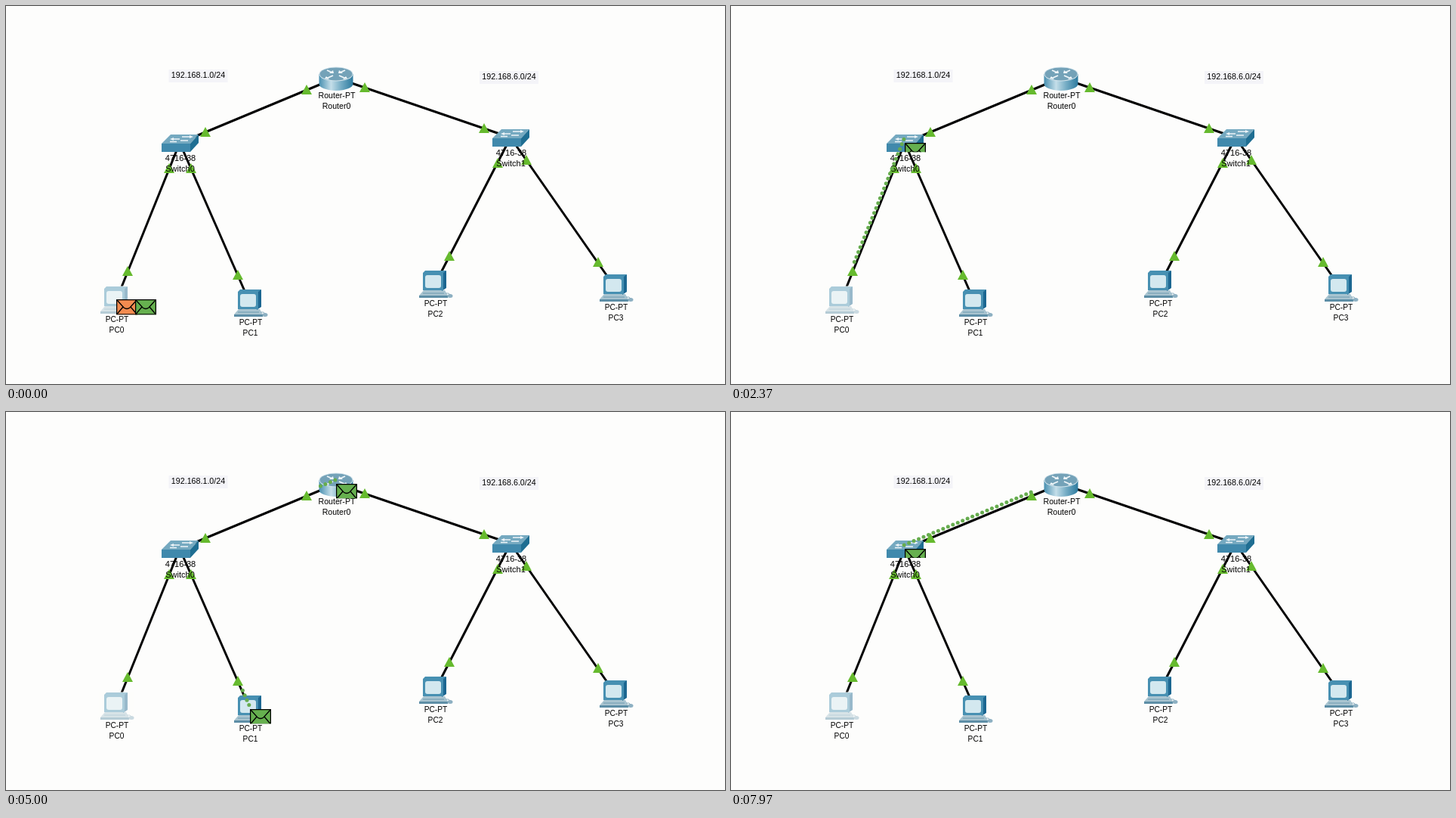
An HTML page with a canvas for the animation above (8 s loop, 952 by 500 pixels).

```html
<!DOCTYPE html>
<html lang="en">
<head>
<meta charset="utf-8">
<title>Network packet simulation</title>
<style>
  html, body { margin: 0; width: 100%; height: 100%; overflow: hidden; background: #fdfdfc; }
  canvas { display: block; }
</style>
</head>
<body>
<canvas id="stage" width="952" height="500"></canvas>
<script>
const ctx = document.getElementById('stage').getContext('2d');
const LOOP = 8000, FLIGHT = 1400;
const ENV_W = 28, ENV_H = 20.5, DOT_GAP = 7;
const GREEN = '#66b04f', ORANGE = '#f28b50';

const pc0 = { x: 146, y: 389 }, pc1 = { x: 323, y: 393 };
const pc2 = { x: 568, y: 368 }, pc3 = { x: 807, y: 373 };
const switch0 = { x: 230, y: 181 }, switch1 = { x: 668, y: 174 };
const router = { x: 437, y: 95 };

const links = [[switch0, router], [router, switch1], [switch0, pc0],
               [switch0, pc1], [switch1, pc2], [switch1, pc3]];
const ports = [[398, 111], [264, 167], [475, 108], [633, 162], [216, 215], [245, 215],
               [161, 351], [307, 356], [651, 208], [689, 204], [587, 331], [784, 339]];
const hops = [
  { start: 694, end: 2372, from: pc0, to: [switch0] },
  { start: 2372, end: 6324, from: switch0, to: [router, pc1] },
  { start: 6324, end: LOOP, from: router, to: [switch0] }
];

function polygon(color, ...points) {
  ctx.fillStyle = color;
  ctx.beginPath();
  points.forEach(([x, y]) => ctx.lineTo(x, y));
  ctx.closePath();
  ctx.fill();
}

function ellipse(color, x, y, rx, ry) {
  ctx.fillStyle = color;
  ctx.beginPath();
  ctx.ellipse(x, y, rx, ry, 0, 0, 2 * Math.PI);
  ctx.fill();
}

function stroke(color, width, ...points) {
  ctx.strokeStyle = color;
  ctx.lineWidth = width;
  ctx.beginPath();
  points.forEach(([x, y]) => ctx.lineTo(x, y));
  ctx.stroke();
}

function text(value, x, y, size) {
  ctx.font = `${size}px "Liberation Sans", Arial, sans-serif`;
  ctx.fillStyle = '#000';
  ctx.fillText(value, x, y);
}

function label(node, model, name, size, dy) {
  text(model, node.x + 1, node.y + dy, size);
  text(name, node.x + 0.5, node.y + dy + 14, size);
}

function at(node, draw) {
  ctx.save();
  ctx.translate(node.x, node.y);
  draw();
  ctx.restore();
}

function computer() {
  polygon('#a9c4d0', [-15, 8], [13, 8], [17, 15], [17, 18], [-21, 18], [-21, 15]);
  polygon('#5d8ea6', [-21, 15], [17, 15], [17, 18], [-21, 18]);
  stroke('#6f9bb0', 1, [-16, 12], [12, 12]);
  polygon('#1c6791', [9, -16], [15, -18], [15, 5], [9, 9]);
  polygon('#4790b2', [-16, -15], [-13, -18], [15, -18], [11, -15], [11, 8], [-16, 8]);
  ctx.fillStyle = '#d3e8ef';
  ctx.beginPath();
  ctx.roundRect(-13, -12, 21, 17, 3);
  ctx.fill();
  stroke('#8fb0c0', 1, [14, 12], [18, 12], [20, 14]);
  ellipse('#8db0c2', 20, 15.5, 3.5, 2.5);
}

function networkSwitch() {
  polygon('#75a9c0', [-12, -11], [25, -11], [14, 1], [-24, 1]);
  polygon('#4089ac', [-24, 1], [14, 1], [14, 12], [-24, 12]);
  polygon('#1f6e92', [14, 1], [25, -11], [25, 0], [14, 12]);
  const white = '#eef5f8';
  stroke(white, 1.5, [-9, -5], [0, -5]);
  stroke(white, 1.5, [3, -8], [13, -8]);
  stroke(white, 1.5, [-13, -1.5], [-4, -1.5]);
  stroke(white, 1.5, [1, -3], [11, -3]);
  polygon(white, [13, -10], [18, -8], [13, -6]);
  polygon(white, [-13, -5], [-8, -7], [-8, -3]);
}

function routerIcon() {
  const body = ctx.createLinearGradient(-22, 0, 22, 0);
  body.addColorStop(0, '#4c92b2');
  body.addColorStop(0.35, '#c4dee9');
  body.addColorStop(0.65, '#76adc5');
  body.addColorStop(1, '#2f7ca0');
  ctx.fillStyle = body;
  ctx.beginPath();
  ctx.ellipse(0, 8, 22.5, 9, 0, 0, Math.PI);
  ctx.lineTo(-22.5, -5);
  ctx.lineTo(22.5, -5);
  ctx.fill();
  ellipse('#d3e4ec', 0, -5, 22.5, 9.5);
  ellipse('#74a2b8', 0, -5, 21.5, 8.5);
  const white = '#f1f7fa';
  for (const side of [-1, 1]) {
    stroke(white, 1.8, [side * 4, -6.5], [side * 12, -10]);
    stroke(white, 1.8, [side * 4, -3], [side * 12, 0.5]);
    polygon(white, [side * 3, -6], [side * 4, -10], [side * 9, -6]);
    polygon(white, [side * 15, 1], [side * 9, 2], [side * 13, -2]);
  }
}

function flap(x, y) {
  ctx.moveTo(x + 1, y + 1);
  ctx.lineTo(x + 10, y + 11);
  ctx.quadraticCurveTo(x + 14, y + 14, x + 18, y + 11);
  ctx.lineTo(x + ENV_W - 1, y + 1);
}

// Shows the slice of an envelope between two fractions of its height.
function envelope(x, y, color, top = 0, bottom = 1) {
  ctx.save();
  ctx.beginPath();
  ctx.rect(x, y + top * ENV_H, ENV_W, (bottom - top) * ENV_H);
  ctx.clip();
  ctx.fillStyle = color;
  ctx.fillRect(x, y, ENV_W, ENV_H);
  ctx.strokeStyle = '#000';
  ctx.lineWidth = 1.3;
  ctx.strokeRect(x + 0.6, y + 0.6, ENV_W - 1.2, ENV_H - 1.2);
  ctx.beginPath();
  flap(x, y);
  ctx.moveTo(x + 1, y + ENV_H - 1);
  ctx.lineTo(x + 9, y + 10);
  ctx.moveTo(x + ENV_W - 1, y + ENV_H - 1);
  ctx.lineTo(x + 19, y + 10);
  ctx.stroke();
  if (top > 0) stroke('#000', 1.3, [x, y + top * ENV_H + 0.6], [x + ENV_W, y + top * ENV_H + 0.6]);
  ctx.restore();
}

function ghost(x, y) {
  ctx.save();
  ctx.fillStyle = '#fdfdfd';
  ctx.fillRect(x, y, ENV_W, ENV_H);
  ctx.strokeStyle = '#000';
  ctx.lineWidth = 1.8;
  ctx.setLineDash([2, 2]);
  ctx.strokeRect(x + 1, y + 1, ENV_W - 2, ENV_H - 2);
  ctx.lineWidth = 1.1;
  ctx.beginPath();
  flap(x, y + 1);
  ctx.stroke();
  ctx.restore();
}

function trail(from, to, tail, head) {
  const dx = to.x - from.x, dy = to.y - from.y, length = Math.hypot(dx, dy);
  for (let d = 0; d <= length * head; d += DOT_GAP) {
    const f = d / length;
    if (f >= tail) ellipse('#66ac4e', from.x + dx * f - 1, from.y + dy * f - 5, 2.5, 2.5);
  }
}

function drawHop({ start, from, to }, time) {
  const elapsed = time - start;
  const front = Math.min(elapsed / FLIGHT, 1);
  const tail = Math.min(Math.max(elapsed / FLIGHT - 1, 0), 1);
  const transfer = Math.min(elapsed / (2 * FLIGHT), 1);
  to.forEach(node => trail(from, node, tail, front));
  if (front < 1) envelope(from.x - ENV_W, from.y, GREEN, transfer, 1);
  for (const node of to) {
    if (front < 1) {
      ghost(Math.round(from.x + (node.x - from.x) * front),
            Math.round(from.y + (node.y - from.y) * front));
    } else {
      envelope(node.x, node.y, GREEN, 0, transfer);
    }
  }
}

function drawNetwork() {
  ctx.fillStyle = '#fdfdfc';
  ctx.fillRect(0, 0, 952, 500);
  links.forEach(([a, b]) => stroke('#000', 3, [a.x, a.y], [b.x, b.y]));
  ports.forEach(([x, y]) => polygon('#66ba2e', [x, y - 7], [x + 7, y + 6], [x - 7, y + 6]));

  [pc0, pc1, pc2, pc3].forEach(node => at(node, computer));
  at(pc0, () => polygon('rgba(253,253,252,.55)', [-23, -19], [24, -19], [24, 19], [-23, 19]));
  [switch0, switch1].forEach(node => at(node, networkSwitch));
  at(router, routerIcon);

  ctx.textAlign = 'center';
  ctx.textBaseline = 'middle';
  [pc0, pc1, pc2, pc3].forEach((node, i) => label(node, 'PC-PT', 'PC' + i, 10.2, 26.5));
  [switch0, switch1].forEach((node, i) => label(node, '4716-38', 'Switch' + i, 11, 20.5));
  label(router, 'Router-PT', 'Router0', 10.6, 24.5);
  for (const [address, x, y] of [['192.168.1.0/24', 254.5, 92.5], ['192.168.6.0/24', 666, 94.5]]) {
    ctx.fillStyle = '#f4f4f8';
    ctx.fillRect(x - 39, y - 8.5, 78, 17);
    text(address, x, y, 10.7);
  }
}

function frame(now) {
  const time = now % LOOP;
  drawNetwork();
  const hop = hops.find(h => time >= h.start && time < h.end);
  if (hop) {
    drawHop(hop, time);
  } else {
    envelope(pc0.x, pc0.y - 1, ORANGE);
    envelope(pc0.x + 25, pc0.y - 1, GREEN);
  }
  requestAnimationFrame(frame);
}
requestAnimationFrame(frame);
</script>
</body>
</html>
```
